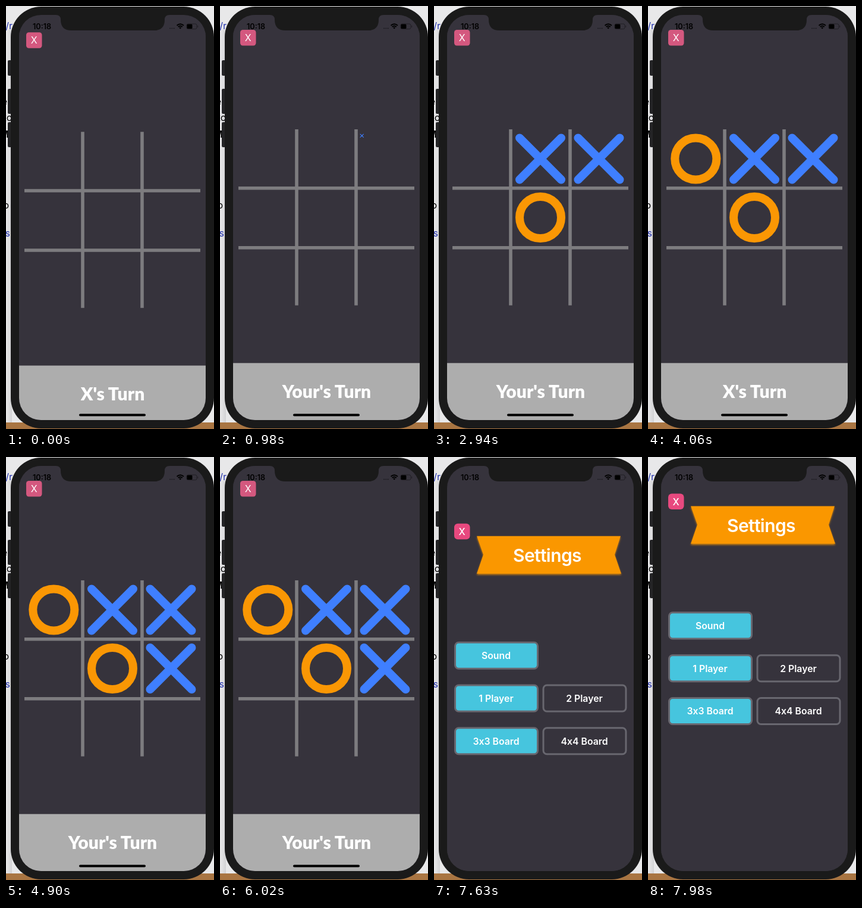
An HTML page that plays this animation: 350 px wide and 710 px high, repeating every 8000 ms.

```html
<!DOCTYPE html>
<html>
<head>
<meta charset="utf-8">
<style>
  html, body { margin: 0; width: 100%; height: 100%; overflow: hidden; background: #e8e8e9; }
  svg { display: block; width: 350px; height: 710px; }
  text { font-family: Inter, Roboto, sans-serif; }
  .mid { text-anchor: middle; fill: #fff; }
  .menu { font: bold 22.6px "Liberation Sans", Arial, sans-serif; }
  .turn { font: 900 30px Lato, sans-serif; }
  .opt { font-size: 15.8px; font-weight: 600; }
  .title { font-size: 30px; font-weight: 600; letter-spacing: -.02em; }
  .page { font-size: 16px; }
</style>
</head>
<body>
<svg viewBox="0 0 350 710">
  <defs>
    <clipPath id="screen"><rect x="22" y="15" width="314" height="680" rx="37"/></clipPath>
    <linearGradient id="shade">
      <stop offset="0" stop-color="#e9e9ea"/><stop offset="1" stop-color="#d2d2d4"/>
    </linearGradient>
    <filter id="glow" x="-10%" y="-20%" width="120%" height="150%">
      <feDropShadow dx="0" dy="2" stdDeviation="1.5" flood-color="#fa9704" flood-opacity=".75"/>
    </filter>
    <path id="X" d="M7 7 77 77M77 7 7 77" fill="none" stroke="#3f7fff" stroke-width="14" stroke-linecap="round"/>
    <circle id="O" cx="42" cy="42" r="35" fill="none" stroke="#fa9704" stroke-width="14"/>
  </defs>

  <!-- page behind the phone -->
  <rect width="350" height="710" fill="#e8e8e9"/>
  <rect y="40" width="10" height="660" fill="url(#shade)"/>
  <rect y="699" width="350" height="11" fill="#a97542"/>
  <g class="page" text-anchor="end">
    <text x="11" y="39" fill="#2433b0">/r</text>
    <text x="2" y="166">e</text>
    <text x="10" y="193">xc</text>
    <text x="5" y="221" font-weight="800">M</text>
    <text x="5" y="340">o</text>
    <text x="7" y="387" fill="#2433b0">s</text>
  </g>

  <!-- phone -->
  <path d="M3 93q0-2 2-2h5v26H5q-2 0-2-2zM3 141q0-2 2-2h5v42H5q-2 0-2-2zM3 197q0-2 2-2h5v42H5q-2 0-2-2z" fill="#242426"/>
  <rect x="8" y="1" width="342" height="708" rx="51" fill="#1a1a1a"/>

  <g clip-path="url(#screen)">
    <rect x="22" y="15" width="314" height="680" fill="#36333c"/>
    <rect x="85" y="307" width="187.5" height="48" rx="7" fill="#34c759"/>
    <rect x="85" y="379" width="187.5" height="48" rx="7" fill="#fa9704"/>
    <text class="mid menu" x="176" y="341">PLAY</text>
    <text class="mid menu" x="176" y="413">SETTINGS</text>

    <g id="game">
      <rect x="22" y="15" width="314" height="680" fill="#36333c"/>
      <rect x="34" y="40" width="26.5" height="26.5" rx="4.5" fill="#d4587f"/>
      <text class="mid" x="47.2" y="59" font-size="16">X</text>
      <path d="M129 207V502.5M229 207V502.5M31 305.7H327M31 405.8H327" stroke="#7d7c7f" stroke-width="5.6"/>
      <g id="marks"></g>
      <rect x="22" y="599.3" width="314" height="100" fill="#adadad"/>
      <text id="turn" class="mid turn" x="179.5" y="657.5"></text>
    </g>

    <g id="settings">
      <rect x="22" y="15" width="314" height="680" fill="#36333c"/>
      <rect x="34" y="61" width="26.5" height="26.5" rx="6" fill="#e8497f"/>
      <text class="mid" x="47.2" y="80" font-size="16" font-weight="500">X</text>
      <path d="M72 82H314L304 113 315 145H72L83 113Z" fill="#fa9704" filter="url(#glow)"/>
      <text class="mid title" x="190.5" y="125">Settings</text>
      <g id="options"></g>
    </g>

    <rect id="home" x="123" y="684.5" width="112" height="4" rx="2"/>
    <path d="M84 14V15Q92 15 92 23Q92 41 110 41H249Q267 41 267 23Q267 15 275 15V14Z" fill="#1a1a1a"/>
    <text x="45" y="39" font-size="12.6" font-weight="600">10:18</text>
    <path d="M275 37.5H284" stroke="#1c1a20" stroke-width="1.5" stroke-dasharray="1.5 1"/>
    <g fill="none" stroke="#000" stroke-width="1.9">
      <path d="M287.5 32.8Q293.2 27.8 299 32.8M289.7 35Q293.2 32 296.8 35"/>
      <path d="M293.2 38.5 291.2 36.4Q293.2 34.8 295.2 36.4Z" fill="#000" stroke="none"/>
    </g>
    <rect x="304" y="30" width="17" height="8.6" rx="2.4" fill="none" stroke="#201e24"/>
    <rect x="304.5" y="30.5" width="9" height="7.6" rx="1.5"/>
    <path d="M322.7 32.8v3" stroke="#201e24"/>
  </g>
</svg>
<script>
const $ = id => document.getElementById(id);
const LOOP = 8000, GROW = 300, HEIGHT = 700;
const GAME_IN = -480, GAME_OUT = 6300, SETTINGS_IN = 7345;

// kind, left, top, start time
const moves = [
  ['X', 235.5, 214.5, 930],
  ['O', 137, 313, 1670],
  ['X', 137, 214.5, 2610],
  ['O', 38.3, 214.5, 3720],
  ['X', 235.5, 313, 4500]
];
$('marks').innerHTML = moves.map(m => `<use href="#${m[0]}"/>`).join('');
const marks = [...$('marks').children];

const option = (label, x, y, on) =>
  `<rect x="${x + 1.5}" y="${y + 1.5}" width="139" height="44" rx="6" stroke="#68676f" stroke-width="3"
    fill="${on ? '#46c5de' : '#36333c'}"/><text class="mid opt" x="${x + 70.5}" y="${y + 29.3}">${label}</text>`;
$('options').innerHTML =
  option('Sound', 34, 259, true) +
  option('1 Player', 34, 330.7, true) + option('2 Player', 182.5, 330.7) +
  option('3x3 Board', 34, 402.5, true) + option('4x4 Board', 182.5, 402.5);

// Critically damped spring: 1 at the start, falling to 0
const spring = ms => {
  const p = Math.max(0, ms) * .015;
  return (1 + p) * Math.exp(-p);
};
const smooth = p => {
  p = Math.min(1, Math.max(0, p));
  return p * p * (3 - 2 * p);
};
const shift = (id, y) => $(id).setAttribute('transform', `translate(0 ${y.toFixed(2)})`);

function draw(t) {
  shift('game', HEIGHT * (t < GAME_OUT ? spring(t - GAME_IN) : 1 - spring(t - GAME_OUT)));
  shift('settings', HEIGHT * spring(t - SETTINGS_IN));
  let label = "X's Turn";
  moves.forEach(([kind, x, y, start], i) => {
    const size = smooth((t - start) / GROW);
    marks[i].setAttribute('transform', `translate(${x} ${y}) scale(${size})`);
    marks[i].setAttribute('visibility', size > 0 ? 'visible' : 'hidden');
    if (t >= start) label = kind === 'X' ? "Your's Turn" : "X's Turn";
  });
  if ($('turn').textContent !== label) $('turn').textContent = label;
  $('home').setAttribute('opacity', 1 - smooth((t - GAME_OUT) / 300));
}

const began = performance.now();
function tick() {
  draw((performance.now() - began) % LOOP);
  requestAnimationFrame(tick);
}
tick();
</script>
</body>
</html>
```
